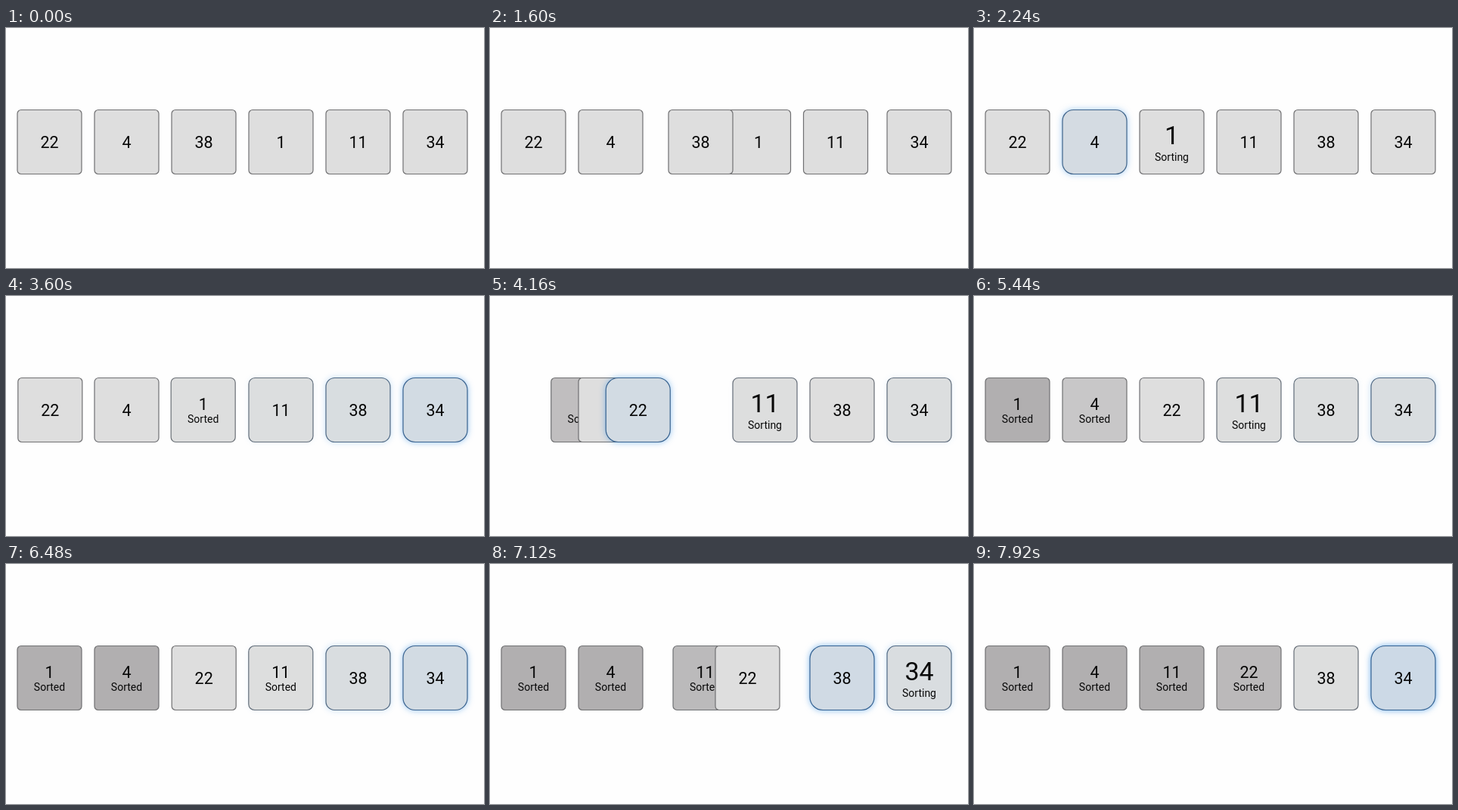
These frames come from a looping animation (632x318 px, 8000 ms). An HTML page with a canvas:

```html
<!DOCTYPE html>
<html lang="en">
<head>
<meta charset="utf-8">
<title>Selection sort</title>
<style>
  html, body { margin: 0; width: 632px; height: 318px; overflow: hidden; background: #fefefe; }
  canvas { display: block; }
</style>
</head>
<body>
<canvas id="stage" width="632" height="318"></canvas>
<script>
const ctx = document.getElementById('stage').getContext('2d');
const LOOP = 8000, STEP = 300, LAG = 250;
const values = [22, 4, 38, 1, 11, 34];

// start, duration, { value: slots to travel }
const moves = [
  [1500, 500, { 38: 2, 1: -1, 11: -1 }],
  [3555, 1000, { 22: 2, 1: -2 }],
  [6450, 1000, { 22: 1, 11: -1 }],
];
// start of each scan and the values it visits, one per STEP
const scans = [
  [1925, [4, 1, 11, 38, 34]],
  [3760, [22, 11, 38, 34]],
  [5370, [11, 38, 34]],
  [6655, [38, 34]],
  [7600, [34]],
];
const sortedAt = { 1: 3555, 4: 4950, 11: 6450, 22: 7240 };

const clamp = x => Math.min(1, Math.max(0, x));
const mix = (a, b, k) => a.map((c, i) => c + (b[i] - c) * k);
const rgb = c => `rgb(${c.map(Math.round)})`;

// cubic-bezier(.42, 0, .58, 1)
function easeInOut(x) {
  x = clamp(x);
  let lo = 0, hi = 1, s = 0.5;
  for (let i = 0; i < 20; i++) {
    s = (lo + hi) / 2;
    const bx = 1.26 * s * (1 - s) ** 2 + 1.74 * s * s * (1 - s) + s ** 3;
    if (bx < x) lo = s; else hi = s;
  }
  return s * s * (3 - 2 * s);
}

// smoothed step: slow start, soft arrival
function rise(t) {
  const x = Math.max(0, t / LAG);
  return 1 - (1 + x) * Math.exp(-x);
}

function tileState(value, t) {
  let slot = values.indexOf(value), target = slot, heat = 0, active = false;
  for (const [start, duration, shifts] of moves) {
    if (t < start || !shifts[value]) continue;
    target += shifts[value];
    slot += shifts[value] * easeInOut((t - start) / duration);
  }
  for (const [start, visited] of scans) {
    const i = visited.indexOf(value);
    if (i < 0) continue;
    const age = t - start - i * STEP;
    heat += rise(age) - rise(age - STEP);
    active = active || (age >= 0 && age < STEP);
  }
  const sorted = t >= sortedAt[value];
  const done = sorted ? easeInOut((t - sortedAt[value]) / 1000) : 0;
  return { value, slot, target, heat, active, sorted, done };
}

function text(str, x, y, size) {
  ctx.font = `${size}px Roboto, sans-serif`;
  ctx.fillText(str, x, y);
}

function drawTile({ value, slot, heat, active, sorted, done }) {
  const x = 15 + slot * 102, mid = x + 42.5;
  const tint = clamp(heat ** 1.6 * 2.7);
  const base = mix([222, 222, 222], [177, 175, 176], done);

  ctx.beginPath();
  ctx.roundRect(x, 108.5, 85, 85, 5 + 27 * heat);
  ctx.shadowBlur = 9;
  ctx.shadowColor = `rgba(50, 140, 225, ${clamp(heat * 1.7 - 0.1)})`;
  ctx.fillStyle = rgb(mix(base, [203, 217, 230], tint));
  ctx.fill();
  ctx.shadowColor = 'transparent';
  ctx.lineWidth = 1.2;
  ctx.strokeStyle = rgb(mix([112, 112, 114], [52, 98, 146], clamp(heat * 2.2)));
  ctx.stroke();

  ctx.fillStyle = '#080808';
  if (active) {
    text(value, mid, 154, 34);
    text('Sorting', mid, 175.5, 14);
  } else if (sorted) {
    text(value, mid, 150.5, 21.5);
    text('Sorted', mid, 167.5, 14);
  } else {
    text(value, mid, 159, 21.5);
  }
}

function frame(now) {
  const t = now % LOOP;
  ctx.fillStyle = '#fefefe';
  ctx.fillRect(0, 0, 632, 318);
  ctx.textAlign = 'center';
  values.map(v => tileState(v, t))
    .sort((a, b) => a.target - b.target)
    .forEach(drawTile);
  requestAnimationFrame(frame);
}
requestAnimationFrame(frame);
</script>
</body>
</html>
```
